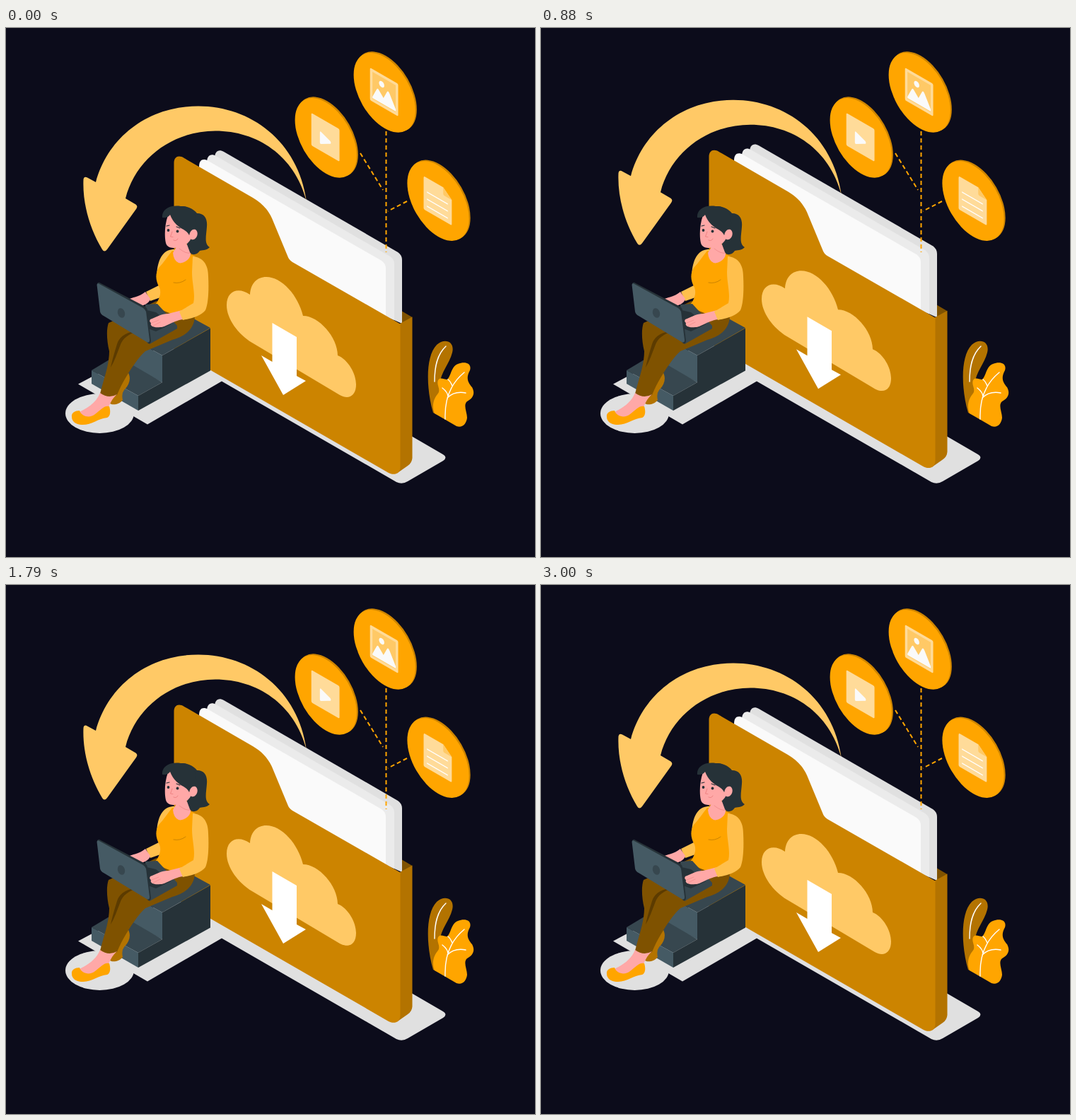
An HTML page that plays this animation: 748 px wide and 748 px high, repeating every 3040 ms.

```html
<!DOCTYPE html>
<html lang="en">
<head>
<meta charset="utf-8">
<title>Cloud folder</title>
<style>
html, body { margin: 0; width: 100%; height: 100%; overflow: hidden; background: #0c0c1b; }
svg { display: block; width: 100vw; height: 100vh; }
.orange { fill: #ffa500; }
.amber { fill: #cc8400; }
.brown { fill: #b37300; }
.bark { fill: #7f5200; }
.honey { fill: #ffc966; }
.sleeve { fill: #ffc04d; }
.cream { fill: #ffdb99; }
.white { fill: #fafafa; }
.shade { fill: #e0e0e0; }
.skin { fill: #ffa8a7; }
.steel { fill: #455a64; }
.slate { fill: #37474f; }
.ink { fill: #263238; }
.line { fill: none; stroke-linecap: round; stroke-linejoin: round; }
</style>
</head>
<body>
<svg viewBox="0 0 748 748">
  <defs>
    <g id="disc">
      <circle class="amber" r="50.6" cx="1.8" cy="-2"/>
      <circle class="orange" r="50.4" cx="-.3" cy=".5"/>
    </g>
  </defs>

  <!-- floor -->
  <path class="shade" d="M102 503.500L200 560.500L305 499.500L552 642Q560 646 568 641L618 612Q625 607 618 603L575 578L289 425L150 478Z"/>
  <ellipse class="shade" cx="132.500" cy="545" rx="48.500" ry="28"/>

  <g id="float">
    <path class="honey" d="M109.500 214Q110.500 209 115 211.500L127 218C144 155 200 110.500 272 110.500C346 110.500 413 160 425 245C408 180 355 145.500 296 145.500C235 145.500 183 185 169 241L183.500 249.500Q187 252 184 256L143 313Q139 318 136 313C119 285 108 249 109.500 214Z"/>
    <path class="shade" d="M295 184C295 174 301 171 308 175L554 317Q560 321 560 328V418L295 300Z"/>
    <path fill="#ebebeb" d="M284 190C284 180 290 177 297 181L543 323Q549 327 549 334V413L284 300Z"/>
    <path class="white" d="M273 196C273 186 279 184 286 188L531 329Q537 333 537 340V410L273 300Z"/>
    <path class="bark" d="M560 400.500L574.500 409L560 418Z"/>
    <path class="brown" d="M557 418L574.500 408.500V608Q574 615 568 619L553 629.500L545 620Z"/>
    <path class="amber" d="M237.500 191C237.500 182 244 179 252 184L349 240C361 247 370 256 376 269L398 322Q400 328 405 331L557.500 418.500V621C557 631 548 633 540 628.500L237.500 454Z"/>
    <path class="honey" d="M345 377C346 361 355 352 368 352C390 352 413 378 420 407C442 407 469 437 469 463C484 469 495 489 495 504C495 520 485 526 472 519L348 445C328 433 312 411 312 392C312 371 329 366 345 377Z"/>
    <path fill="#fff" d="M376.500 417L411 437V492L424 499L392 519L361 463L376.500 472Z"/>
  </g>

  <!-- media discs -->
  <g class="line" stroke="#ffa500" stroke-width="2" stroke-dasharray="6 4" style="stroke-linecap:butt">
    <path d="M537.500 146V317"/>
    <path d="M501 177L533 229"/>
    <path d="M567 245L540 259"/>
  </g>
  <g transform="matrix(.866 .5 0 1 452.500 155)">
    <use href="#disc"/>
    <rect class="cream" x="-24" y="-23" width="46" height="46" rx="2"/>
    <path class="white" d="M-10 -2Q-10 -5 -8 -4L7 1.500Q9 3 7.500 5L-8 13Q-10 14 -10 12Z"/>
  </g>
  <g transform="matrix(.866 .5 0 1 535.500 91)">
    <use href="#disc"/>
    <rect class="cream" x="-24" y="-23" width="46" height="46" rx="2"/>
    <rect class="honey" x="-20" y="-19" width="38" height="38"/>
    <circle class="white" cx="-5" cy="-9" r="4.300"/>
    <path class="white" d="M-20 16L-13 2Q-11 -1 -9 2L-2 9L4 -3Q6 -6 8 -2L18 15V18H-20Z"/>
  </g>
  <g transform="matrix(.866 .5 0 1 611.300 244.200)">
    <use href="#disc"/>
    <path class="cream" d="M-24 -20Q-24 -23 -22 -23H8L22 -12V22Q22 24 20 24H-22Q-24 24 -24 22Z"/>
    <path class="honey" d="M8 -23L22 -12H10Q8 -12 8 -14Z"/>
    <path class="line" stroke="#fff" stroke-width="1.500" d="M-18 -3H15M-18 7H15M-18 17H15"/>
  </g>

  <!-- plant -->
  <path class="brown" d="M604 544C594 510 593 464 609 448C620 438 635 443 631 459C627 475 615 486 613 504L614 549Z"/>
  <path class="orange" d="M606 545C602 536 604 525 610 518C616 511 608 505 611 498C614 493 619 497 624 497C630 491 629 479 639 475C649 471 659 474 656 484C650 495 653 501 659 508C664 517 660 524 652 528C646 533 652 543 652 551C651 560 645 566 637 563Z"/>
  <g class="line" stroke="#fff" stroke-width="1.400">
    <path d="M622 450C609 462 606 480 606 500"/>
    <path d="M621 553C620 526 627 504 648 487M625 522Q625 515 617 509M624 523Q634 513 650 516M631 506Q628 499 625 497"/>
  </g>

  <!-- seat -->
  <path class="slate" d="M150 424L221 463L289 424L236 395Z"/>
  <path class="steel" d="M150 424L221 463V501L150 464Z"/>
  <path class="slate" d="M121 484L156 463L221 501L187 520Z"/>
  <path class="steel" d="M121 484L187 520V541L121 503Z"/>
  <path class="ink" d="M221 463L289 424.500V484.500L187 541V520L221 501Z"/>

  <!-- legs -->
  <path class="brown" d="M172 486C178 495 174 505 167 512Q163 517 165 526C160 533 149 534 146 530L149 514Z"/>
  <path class="bark" d="M213 386L267 408C266 428 250 437 235 441L197 457C184 468 163 503 157 519Q145 525 133 517C139 494 146 476 146 457C142 440 142 425 145 417L175 404Z"/>
  <path fill="#5c3b00" d="M188 428C169 430 161 436 157 447C153 460 150 470 148 480C154 470 157 460 161 450C165 438 173 433 188 428Z"/>
  <path class="skin" d="M133 516Q145 525 157 518C149 525 147 532 144 538L139 548L110 556L98 546C114 538 127 531 133 516Z"/>
  <path class="orange" d="M93 550C92 544 98 541 104 541C107 550 119 552 126 546C134 540 139 533 146 535C148 541 148 549 143 551C130 552 121 562 106 561C98 560 93 556 93 550Z"/>

  <!-- body -->
  <path class="sleeve" d="M238 313C224 313 217 323 214 340C212 352 214 360 216 364L198 373L204 386L224 379L240 340Z"/>
  <path class="orange" d="M235 315C244 318 256 318 266 322C276 330 275 354 268 374L267 405C247 410 222 403 211 391C217 384 220 375 217 367C211 357 211 347 216 339C223 332 229 322 235 315Z"/>
  <path class="line" stroke="#cc8400" d="M237 360Q246 362 254 356"/>
  <path class="skin" d="M236 318L243 306H263L261 320C260 328 250 334 244 332Q237 329 236 318Z"/>
  <path class="line" stroke="#f28f8f" d="M245 312Q255 320 261 318"/>

  <!-- laptop -->
  <path class="skin" d="M168 386C179 380 188 381 197 373L204 383C202 391 193 392 185 395L174 392Z"/>
  <path class="slate" d="M197 391L214 390L242 421V425L203 447L198 440Z"/>
  <path class="ink" d="M199 399L212 402L233 419L212 429L201 425Z"/>
  <path class="ink" d="M129 362Q130 358 134 361L197 394Q200 396 200 400L205 442Q205 447 201 446Z"/>
  <path class="steel" d="M128.500 363Q129 360 132 362L194 396Q197 398 198 401L203 441Q203 446 199 444L138 407Q134 405 133 401Z"/>
  <ellipse class="slate" cx="163" cy="403" rx="5" ry="7" transform="rotate(-18 163 403)"/>

  <!-- near arm -->
  <path class="skin" d="M249 399L229 404C219 404 215 408 204 412Q202 415 205 417C203 422 210 424 218 423C227 423 233 415 250 412Z"/>
  <path class="line" stroke="#f28f8f" stroke-width=".8" d="M206 417L216 413M208 421L218 416"/>
  <path class="sleeve" d="M264 323C278 324 286 334 286 351C287 372 286 390 282 399C276 407 262 411 250 413L245 401L265 389C268 375 263 362 263 345Z"/>

  <!-- head -->
  <path class="ink" d="M246 252C258 251 266 257 270 262C281 262 285 270 284 281C283 295 280 305 288 310C284 315 276 314 274 315C270 321 263 322 260 317L250 290Z"/>
  <path class="skin" d="M229 265C224 279 224 296 226 304C228 311 235 312 244 310Q257 308 262 297L258 270L240 260Z"/>
  <path class="ink" d="M221 268C220 256 232 250 247 252C262 252 270 262 269 278L265 288L259 293C256 286 247 284 241 278Q235 272 232 264Q229 269 221 268Z"/>
  <ellipse class="skin" cx="265" cy="292" rx="5.500" ry="7.500" transform="rotate(18 265 292)"/>
  <circle class="ink" cx="229.500" cy="286" r="1.900"/>
  <circle class="ink" cx="242.500" cy="287.500" r="1.900"/>
  <path class="line" stroke="#263238" stroke-width="1.200" d="M227 280L231 279M241 281L246 283"/>
  <path class="line" stroke="#ed7f7f" stroke-width=".9" d="M235 288L232.500 295L236 295.500M237 300Q241 302 243 298"/>
</svg>
<script>
const HALF = 1500, LOOP = 3040, RISE = 15;
const float = document.getElementById("float");

function draw(now) {
  const t = Math.min(now % LOOP, 2 * HALF);
  const lift = RISE * (1 - Math.abs(t - HALF) / HALF);
  float.setAttribute("transform", `translate(0 ${-lift})`);
  requestAnimationFrame(draw);
}
draw(performance.now());
</script>
</body>
</html>
```
